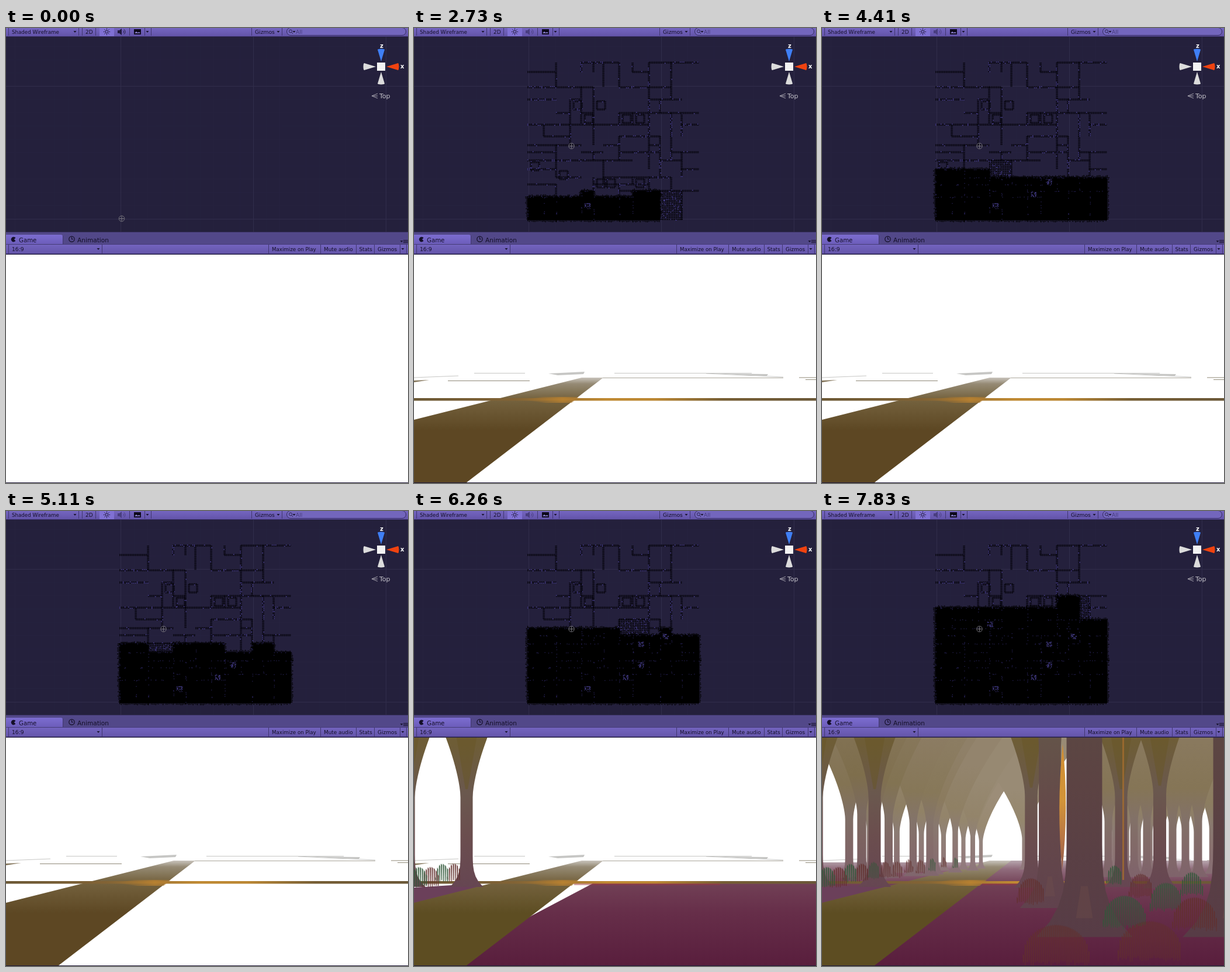
These frames come from a looping animation (688 px wide and 777 px high, 8 s). An HTML page with a canvas:

```html
<!DOCTYPE html>
<html lang="en">
<head>
<meta charset="utf-8">
<style>
html, body { margin: 0; width: 100%; height: 100%; overflow: hidden; background: #fff; }
canvas { display: block; width: 688px; height: 777px; }
</style>
</head>
<body>
<canvas id="stage" width="688" height="777"></canvas>
<script>
const g = document.getElementById('stage').getContext('2d');
const LOOP = 8000, START = 1160, STEP = 88;
const FLOOR_T = 6170, WIDE_T = 6520, FAR_T = 7220;
const HORIZON = 597, GROUND = 328, FILL_RATE = 7.2;
const GREEN = '#31583a', RUST = '#62302e', INK = '#140f28', RULE = '#40366f';

function seeded(n) {
  let s = (n * 7919 + 12345) >>> 0;
  return () => (s = (s * 1664525 + 1013904223) >>> 0) / 4294967296;
}
function box(c, x, y, w, h) { g.fillStyle = c; g.fillRect(x, y, w, h); }
function poly(c, ...p) {
  g.fillStyle = c;
  g.beginPath();
  for (let i = 0; i < p.length; i += 2) g.lineTo(p[i], p[i + 1]);
  g.fill();
}
function line(c, x1, y1, x2, y2, w = 1) {
  g.strokeStyle = c; g.lineWidth = w;
  g.beginPath(); g.moveTo(x1, y1); g.lineTo(x2, y2); g.stroke();
}
function ring(c, x, y, r, w = 1, a = 0, b = 7) {
  g.strokeStyle = c; g.lineWidth = w;
  g.beginPath(); g.arc(x, y, r, a, b); g.stroke();
}
function text(s, x, y, size = 9, c = INK, weight = '') {
  g.font = `${weight} ${size}px "DejaVu Sans", sans-serif`;
  g.fillStyle = c; g.fillText(s, x, y);
}
function ramp(x1, y1, x2, y2, stops) {
  const f = g.createLinearGradient(x1, y1, x2, y2);
  for (const [p, c] of stops) f.addColorStop(p, c);
  return f;
}
const fade = (y1, y2, ...stops) => ramp(0, y1, 0, y2, stops);

// Stack rooms: always raise the lowest, leftmost part of the skyline.
// Filling goes on at a constant area per millisecond.
function buildRooms() {
  const xs = [194, 222, 243, 267, 286, 307, 324, 351, 374, 402, 421, 440, 458, 488];
  const ys = [GROUND, 288, 278, 267, 255, 241, 226, 212, 200, 185, 165, 145, 122, 101, 75, 59];
  const rnd = seeded(11), tops = xs.slice(1).fill(0), list = [];
  let area = 0;
  for (;;) {
    const low = Math.min(...tops), i = tops.indexOf(low);
    if (low === ys.length - 1) return list;
    const wide = tops[i + 1] === low && rnd() < .6 ? 2 : 1;
    const top = Math.min(low + 1 + Math.floor(rnd() * 2), ys.length - 1);
    tops.fill(top, i, i + wide);
    const x = xs[i], y = ys[top], w = xs[i + wide] - x, h = ys[low] - y;
    list.push({ x, y, w, h, t: START + Math.floor(area / FILL_RATE / STEP) * STEP, seed: list.length + 1 });
    area += w * h;
  }
}

// Near trees by place and scale; the nearest appear first
const nearTrees = [
  [46.5, .65], [92, .7], [184.5, .58], [-9, 1], [90, 1], [358, 1.02],
  [512, 1], [578, 1.05], [390, 1.8], [449, 2.9], [700, 2.9]
].map(([x, s]) => ({ x, s, t: s === 1 && x < 100 ? 5550 : 6340 + (2.9 - s) * 240 }));

function farTrees() {
  const list = [];
  const add = (x, s, k) => list.push({ x, s, t: FAR_T + (k % 4) * STEP });
  add(258, .34, 1);
  add(346, .34, 1);
  for (let k = 0; k < 6; k++) {
    const x = 258 - 28 * k - 2 * k * k;
    add(x + 14, .3 + .04 * k, k);
    add(x, .38 + .07 * k, k);
  }
  for (let k = 0; k < 8; k++) {
    add(501 + 20 * k, .45, k);
    add(490 + 22 * k, .62, k + 1);
  }
  add(668, .5, 3);
  return list;
}

function growBushes() {
  const list = [], rnd = seeded(8);
  const add = (x, base, c, t) => list.push({ x, base, c, t });
  for (let x = 8; x < 230; x += 20)
    add(x, 650 - x * .17 - rnd() * 8, rnd() < .45 ? GREEN : RUST, x < 70 ? 5550 : 6780);
  for (const [x, y] of [[500, 640], [632, 658], [588, 684], [517, 714]]) add(x, y, GREEN, 6430);
  for (const [x, y] of [[545, 662], [357, 673], [637, 718], [560, 770], [400, 778]]) add(x, y, RUST, 6520);
  return list.sort((a, b) => a.base - b.base);
}

const rooms = buildRooms();
rooms.forEach((r, i) => { r.done = i + 1 < rooms.length ? Math.max(rooms[i + 1].t, r.t + STEP) : LOOP; });
const trees = [...farTrees(), ...nearTrees].sort((a, b) => a.s - b.s);
const bushes = growBushes();
const times = [...rooms, ...trees, ...bushes].map(o => o.t)
  .concat(rooms.map(r => r.done), FLOOR_T, WIDE_T, FAR_T);

function corridor(x, y, len, flat, seed) {
  const rnd = seeded(seed), blue = rnd() < .28 ? .35 : .07;
  const put = (a, b, c, s) => flat ? box(c, x + a, y + b, s, s) : box(c, x + b, y + a, s, s);
  if (flat) box('rgba(8,7,18,.4)', x, y - 1.5, len, 3);
  else box('rgba(8,7,18,.4)', x - 1.5, y, 3, len);
  for (let a = 0; a < len; a += 3)
    for (const b of [-1.5, .5]) put(a, b, rnd() < blue ? '#4a4196' : '#08070f', 1.4);
}

function maze() {
  for (const { x, y, w, h, seed } of rooms) {
    const rnd = seeded(seed * 5), keep = y > 140 ? .8 : .6;
    if (rnd() < keep) corridor(x, y, w, true, seed);
    if (x > 194 && rnd() < keep) corridor(x, y, h, false, seed + 90);
    if (rnd() < .12) {
      for (const d of [0, 14]) {
        corridor(x + 6, y + 3 + d, 14, true, seed + d);
        corridor(x + 6 + d, y + 3, 14, false, seed + d + 1);
      }
    }
  }
}

function specks(x, y, w, h, n, c, rnd) {
  for (let i = 0; i < n; i++) box(c, x + rnd() * w, y + rnd() * h, 1.2, 1.2);
}

function sow({ x, y, w, h, seed }) {
  for (let a = 0; a < w; a += 3)
    for (let b = 0; b < h; b += 3) box('#04030a', x + a, y + b, 2, 2);
  specks(x, y, w, h, w * h / 24, '#4f46a3', seeded(seed));
}

function fill({ x, y, w, h, seed }) {
  const rnd = seeded(seed), spike = () => 1 + rnd() * 3;
  box('#000', x, y, w, h);
  for (let a = 0; a < w; a += 2.5)
    for (const [edge, k] of [[y, -1], [y + h, 1]]) box('#000', x + a, edge, 1.3, spike() * k);
  for (let b = 0; b < h; b += 2.5)
    for (const [edge, k] of [[x, -1], [x + w, 1]]) box('#000', edge, y + b, spike() * k, 1.3);
}

function glints({ x, y, w, h, seed }) {
  const rnd = seeded(seed + 30);
  specks(x, y, w, 1, w / 9, '#2c2762', rnd);
  specks(x, y, 1, h, h / 9, '#2c2762', rnd);
  if (seed % 9 === 4) specks(x + w / 2 - 5, y + h / 2 - 4, 10, 9, 30, '#463e8a', rnd);
}

function sceneView(t) {
  box('#24203c', 0, 14, 688, 334);
  for (let i = 0; i < 31; i++) line('#26223f', 15.5 + i * 22.65, 14, 15.5 + i * 22.65, 348);
  for (let i = 0; i < 15; i++) line('#26223f', 0, 31.5 + i * 22.65, 688, 31.5 + i * 22.65);
  for (const x of [196.5, 423.5, 650.5]) line('#312d4b', x, 14, x, 348);
  for (const y of [99.5, 326.5]) line('#312d4b', 0, y, 688, y);
  const on = t >= START;
  if (on) {
    const filled = rooms.filter(r => t >= r.done);
    maze();
    rooms.filter(r => t >= r.t && t < r.done).forEach(sow);
    filled.forEach(fill);
    filled.forEach(glints);
  }
  const cx = on ? 269.5 : 198, cy = on ? 201.5 : 325.5;
  ring('#77757d', cx, cy, 4.8);
  line('#77757d', cx - 4, cy, cx + 4, cy);
  line('#77757d', cx, cy - 4, cx, cy + 4);
  axes();
}

function axes() {
  const arms = ['#f04310', '#dcdcdc', '#dcdcdc', '#3f7ff5'];
  arms.forEach((c, i) => {
    g.save();
    g.translate(642, 66);
    g.rotate(i * Math.PI / 2);
    poly(c, 9, 0, 29, -6, 29, 6);
    g.beginPath(); g.ellipse(29, 0, 1.5, 6, 0, 0, 7); g.fill();
    g.restore();
  });
  box('#f3f3f3', 635, 59, 14, 14);
  text('z', 640, 34, 10, '#fff', 'bold');
  text('x', 675, 69, 10, '#fff', 'bold');
  text('Top', 639, 120, 11, '#c4c2ca');
  for (const dy of [-4, 0, 4]) line('#a5a2ad', 626, 116, 636, 116 + dy);
}

function bar(y, h, rules) {
  box(fade(y, y + h, [0, '#7465c0'], [1, '#6354a9']), 0, y, 688, h);
  for (const x of rules) box(RULE, x, y, 1, h - 1);
}
function arrow(x, y) { poly('#1a1530', x - 2.5, y - 1, x + 2.5, y - 1, x, y + 2); }

function toolbar(t) {
  bar(0, 14, [4, 124, 130, 153, 211, 237, 248, 420, 472]);
  box('#8071d4', 160, 0, 25, 14);
  box('#3b3168', 0, 14, 688, 1);
  text('Shaded Wireframe', 10, 10, 8.7);
  text('2D', 136, 10);
  text('Gizmos', 426, 10, 9.2);
  for (const x of [118, 242, 466]) arrow(x, 6);
  ring(INK, 172.5, 6.5, 2.3);
  for (let a = 0; a < 6.2; a += Math.PI / 4) {
    const c = Math.cos(a), s = Math.sin(a);
    line(INK, 172.5 + c * 3.8, 6.5 + s * 3.8, 172.5 + c * 5.6, 6.5 + s * 5.6);
  }
  const sound = t < START ? '#211a3e' : '#493e80';
  poly(sound, 191, 4, 194, 4, 198, 1, 198, 12, 194, 9, 191, 9);
  for (const r of [2.5, 5]) ring(sound, 199, 6.5, r, 1, -1, 1);
  box('#0e0a1c', 219, 2, 12, 9);
  poly('#8e82d4', 220, 9, 223, 6, 225, 8, 228, 7, 230, 9);
  g.fillStyle = '#7366bd'; g.strokeStyle = '#352c5e'; g.lineWidth = 1;
  g.beginPath(); g.roundRect(480.5, -.5, 204, 13, 6.5); g.fill(); g.stroke();
  ring('#2a2350', 487, 5.5, 2.5);
  line('#2a2350', 489, 7.5, 491, 10);
  arrow(493, 6);
  text('All', 496, 9.5, 9, '#463b7e');
}

function tabs() {
  box('#524889', 0, 348, 688, 21);
  box('#39315f', 0, 348, 688, 1);
  g.fillStyle = fade(353, 369, [0, '#7c6dd0'], [1, '#6c5dba']);
  g.beginPath(); g.roundRect(-4, 353, 101, 20, 3); g.fill();
  box(RULE, 97, 355, 1, 14);
  g.fillStyle = INK;
  g.beginPath(); g.moveTo(14, 361); g.arc(13, 361, 4.3, .65, 5.6); g.fill();
  text('Game', 22, 366, 10.2);
  ring(INK, 112.5, 360.5, 4.7, 1.2);
  line(INK, 112.5, 357, 112.5, 361);
  line(INK, 112, 360.5, 115, 360.5);
  text('Animation', 122, 366, 10.6);
  arrow(677, 364);
  for (const y of [362, 364, 366]) box('#1a1530', 680, y, 8, 1);

  bar(369, 17, [4, 164, 449, 538, 599, 630, 674, 685]);
  box('#463c78', 0, 369, 688, 1);
  text('16:9', 10, 381, 9.2);
  for (const x of [158, 679]) arrow(x, 377);
  text('Maximize on Play', 455, 381, 8.7);
  text('Mute audio', 544, 381, 8.9);
  text('Stats', 604.5, 381, 8.7);
  text('Gizmos', 636, 381);
  box('#251f42', 0, 385.5, 688, 1.5);
}

// Half width of a tree at height h: slim trunk, spreading crown, flared foot
function girth(h) {
  const crown = Math.max(0, h - 110) ** 1.5 / 40;
  const foot = 18 * (Math.max(0, 20 - h) / 65) ** 4;
  return 10.5 + crown + foot;
}
const bark = [
  [362, [117, 100, 68]], [200, [110, 93, 54]], [115, [106, 88, 78]],
  [45, [107, 78, 78]], [-45, [102, 70, 82]]
];

function tree({ x, s }) {
  const fog = Math.max(0, 1 - s) * .62, dim = 1 - Math.max(0, s - 1) * .075;
  const haze = [206, 195, 188];
  const skin = bark.map(([h, c]) => [(362 - h) / 407,
    `rgb(${c.map((v, i) => Math.round((v + (haze[i] - v) * fog) * dim)).join()})`]);
  const left = [], right = [];
  for (let h = 720; h >= -45; h -= 9) {
    const w = girth(h) * s, y = HORIZON - h * s;
    left.push(x - w, y);
    right.unshift(x + w, y);
  }
  for (let i = 0; i < right.length; i += 2) [right[i], right[i + 1]] = [right[i + 1], right[i]];
  const outline = left.slice();
  for (let i = left.length - 2; i >= 0; i -= 2) outline.push(2 * x - left[i], left[i + 1]);
  poly(fade(HORIZON - 362 * s, HORIZON + 45 * s, ...skin), ...outline);
  const wedge = (c, w1, h1, w2, h2) => poly(c,
    x - w1 * s, HORIZON - h1 * s, x + w1 * s, HORIZON - h1 * s,
    x + w2 * s, HORIZON - h2 * s, x - w2 * s, HORIZON - h2 * s);
  if (s >= 1) wedge('rgba(104,86,38,.5)', 18, 215, 2, 122);
  if (s > 1.5) wedge('rgba(122,88,76,.22)', 2, -15, 5, -34);
}

// Size follows the distance given by the base line
function bush({ x, base, c }) {
  const s = (base - HORIZON) / 45, r = 14 * s, h = 36 * Math.sqrt(s);
  const rnd = seeded(Math.round(x * 3 + base));
  g.globalAlpha = .16;
  g.fillStyle = c;
  g.beginPath(); g.ellipse(x, base - h * .1, r, h * .88, 0, Math.PI, 0); g.fill();
  g.globalAlpha = s < .8 ? .75 : 1;
  for (let a = -r; a <= r; a += 3.4) {
    const tall = h * (.3 + .7 * Math.sqrt(1 - (a / r) ** 2)), low = base - rnd() * h * .16;
    poly(c, x + a, base - tall, x + a + 1.7, base - tall + 3, x + a + 1.3, low, x + a + .4, low);
  }
  g.globalAlpha = 1;
}

function distance() {
  const grey = '#c6c6c4', brown = '#8f8877';
  line(grey, 103, 589.5, 190, 589.5);
  line(grey, 343, 589.5, 578, 589.5);
  line(grey, 0, 597, 76, 594);
  line(grey, 500, 590, 632, 596);
  poly(grey, 230, 590, 292, 587, 290, 591, 246, 593);
  poly(grey, 515, 590, 606, 591, 604, 594, 570, 593);
  line('#aaa69b', 287, 597.5, 632, 597.5);
  line(brown, 58, 602.5, 198, 602.5);
  line(brown, 659, 597, 688, 597);
  line(brown, 670, 600.5, 688, 600.5);
  poly('#84755a', 0, 602, 26, 601, 0, 605);
}

function ground(t) {
  const wine = fade(HORIZON, 776, [0, '#b7a6ae'], [.08, '#906c7c'], [.23, '#713f55'], [.5, '#662e49'], [1, '#591e3d']);
  const olive = t >= FLOOR_T, near = olive ? '#5d4d22' : '#5d4723';
  if (olive) {
    const y = t >= WIDE_T ? HORIZON : 636;
    poly(wine, 306, y, 688, y, 688, 776, 40, 776);
  }
  if (t >= WIDE_T) {
    const y = t >= FAR_T ? 600 : 614;
    poly(wine, 0, y, 290, y, 0, 676);
  }
  if (t >= 5550) poly('#6b405a', 0, 643, 80, 638, 124, 641, 0, 672);
  poly(fade(HORIZON, 776, [0, '#c9c4bd'], [.06, '#958a74'], [.2, '#75633f'], [.5, near], [1, near]),
    287, 597, 324, 597, 90, 776, 0, 776, 0, 669);
  box(ramp(0, 0, 688, 0, [[0, '#6c5936'], [.25, '#826335'], [.48, '#c08a33'], [.6, '#bb8733'], [.77, '#765e35'], [1, '#6b5838']]),
    0, 632, 688, 4.5);
  if (olive) box('rgba(155,55,60,.45)', 274, 636, 250, 3);
  const halo = g.createRadialGradient(255, 635, 0, 255, 635, 70);
  halo.addColorStop(0, 'rgba(188,131,48,.8)');
  halo.addColorStop(1, 'rgba(160,110,45,0)');
  poly(halo, 185, 635, 220, 630, 282, 630, 270, 640, 225, 640);
}

function gameView(t) {
  box('#fff', 0, 387, 688, 389);
  box('#211b38', 0, 776, 688, 1);
  if (t < START) return;
  g.save();
  g.beginPath(); g.rect(0, 387, 688, 389); g.clip();
  distance();
  ground(t);
  const shown = o => t >= o.t;
  const front = trees.filter(shown);
  front.filter(o => o.s < 1.5).forEach(tree);
  if (t >= 6430) box('rgba(166,110,46,.75)', 514, 387, 3, 243);
  front.filter(o => o.s >= 1.5).forEach(tree);
  if (t >= FAR_T + STEP) {
    g.fillStyle = fade(398, 615, [0, '#d18d32'], [.45, '#d29438'], [.75, '#b77545'], [1, '#8e5a4d']);
    g.beginPath(); g.moveTo(412, 398);
    g.quadraticCurveTo(423, 507, 411, 615);
    g.quadraticCurveTo(401, 507, 412, 398);
    g.fill();
  }
  bushes.filter(shown).forEach(bush);
  g.restore();
}

let last = -1;
function tick() {
  const t = performance.now() % LOOP;
  const stage = times.filter(x => x <= t).length;
  if (stage !== last) {
    last = stage;
    sceneView(t);
    gameView(t);
    toolbar(t);
    tabs();
  }
  requestAnimationFrame(tick);
}
tick();
</script>
</body>
</html>
```
